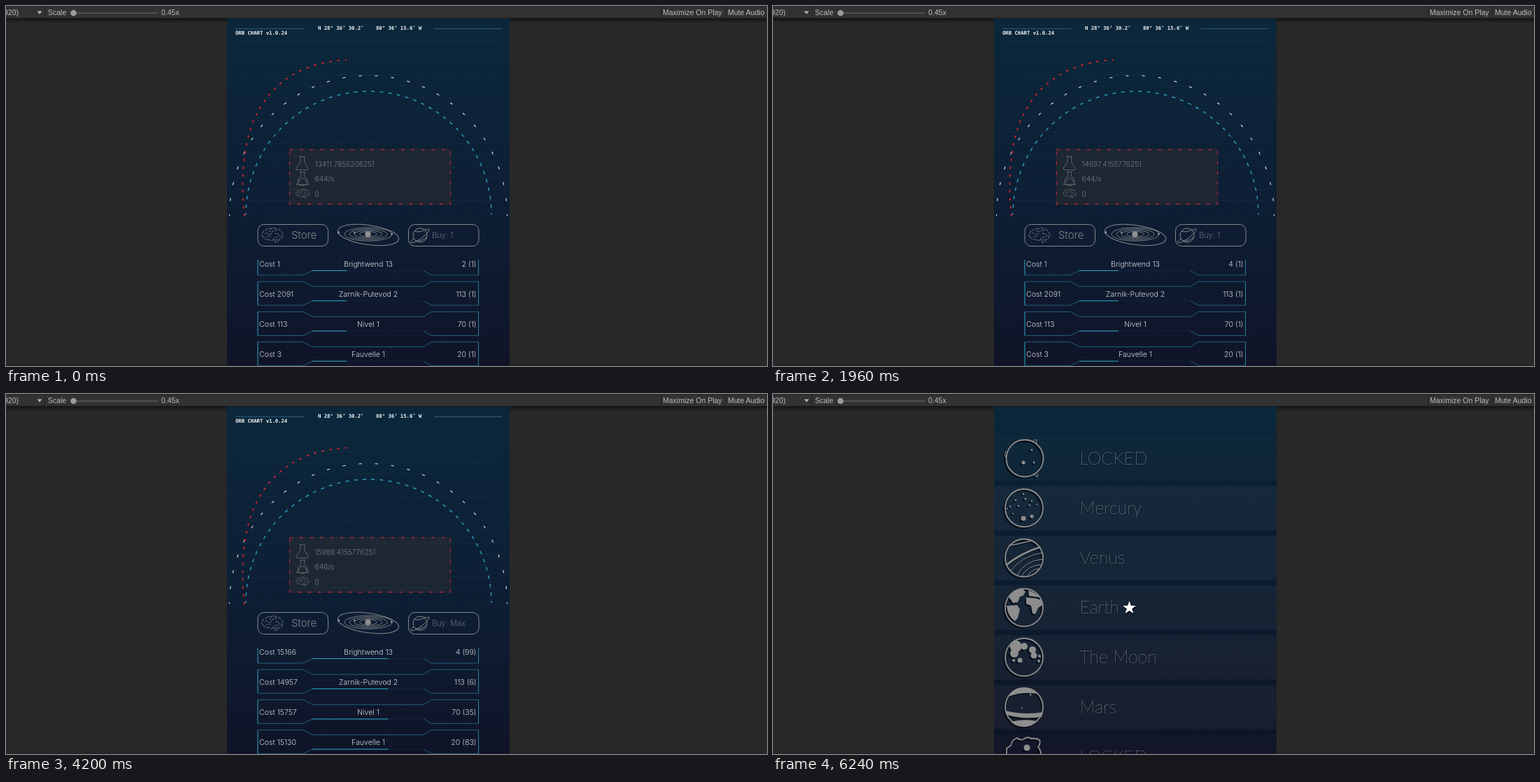
Write an HTML page that moves like this. It is 1088x515 px and loops after 8000 ms.

```html
<!DOCTYPE html>
<html lang="en">
<head>
<meta charset="utf-8">
<title>Satellite game</title>
<style>
html, body { margin: 0; width: 100%; height: 100%; overflow: hidden; background: #282828; }
svg { display: block; width: 1088px; height: 515px; }
text { white-space: pre; }
.ui { font: 10.5px "Liberation Sans", Arial, sans-serif; fill: #bdbdbd; }
.mono { font: bold 7.25px "DejaVu Sans Mono", monospace; fill: #f2f5f7; }
.game { font: 300 10.6px Inter, "Open Sans", sans-serif; fill: #d3d7db; }
.stat { font-size: 10.2px; fill: #777c80; }
.line { fill: none; stroke: #858789; stroke-width: 1; }
.thin { stroke: #6c7174; stroke-width: .8; }
.box { fill: none; stroke: #216a84; stroke-width: .9; }
.planets { fill: none; stroke: #8d8d8d; stroke-width: 1.8; filter: drop-shadow(-2px 2px 0 #050c16); }
.planets .fill { fill: #8d8d8d; stroke: none; }
.names { font: 100 25px Lato, "Open Sans", sans-serif; fill: #d3d6d9; filter: drop-shadow(1.5px 2px .5px #03070d); }
</style>
</head>
<body>
<svg viewBox="0 0 1088 515">
  <defs>
    <linearGradient id="sky" x1="0" y1="0" x2="0" y2="1">
      <stop offset="0" stop-color="#0b273b"/>
      <stop offset=".5" stop-color="#0d1f35"/>
      <stop offset="1" stop-color="#101428"/>
    </linearGradient>
    <linearGradient id="shade" x1="0" y1="0" x2="0" y2="1">
      <stop offset="0" stop-opacity=".5"/>
      <stop offset="1" stop-opacity="0"/>
    </linearGradient>
    <clipPath id="panel"><rect x="316" y="18" width="404" height="497"/></clipPath>
    <clipPath id="list"><rect x="350" y="363" width="340" height="152"/></clipPath>
    <g id="brain">
      <path vector-effect="non-scaling-stroke" d="M3 14Q-1 11 2 8Q2 4 7 4Q9 0 14 2Q18-1 22 2Q27 2 28 6Q33 9 30 13Q30 17 25 17Q24 22 20 21L18 17Q14 20 11 17Q6 18 3 14" stroke-dasharray="5 1.500"/>
      <path vector-effect="non-scaling-stroke" d="M5 9Q8 6 10 9T15 8M12 4Q13 8 17 5T23 6M7 14Q10 10 13 13M20 9Q24 7 25 11T29 11M17 17Q20 13 24 14M20 18L23 17" stroke-dasharray="3 1.500"/>
    </g>
  </defs>

  <rect width="1088" height="515" fill="#282828"/>
  <rect width="1088" height="17" fill="#323232"/>
  <rect width="1088" height="1" fill="#202020"/>
  <rect y="17" width="1088" height="1" fill="#1c1c1c"/>
  <rect y="18" width="1088" height="6" fill="url(#shade)"/>
  <rect y="514" width="1088" height="1" fill="#1e1e1e"/>
  <g fill="#222"><path d="M55 1h1v16h-1zM936 1h1v16h-1zM1028 1h1v16h-1z"/></g>
  <g class="ui">
    <text x="18" y="13" text-anchor="end">920)</text>
    <path d="M44.500 7.500h7l-3.500 4z"/>
    <text x="60" y="13">Scale</text>
    <rect x="97" y="9.500" width="120" height="1.300" fill="#626262"/>
    <circle cx="96.500" cy="10" r="4.300" fill="#9b9b9b"/>
    <text x="222" y="13">0.45x</text>
    <text x="939" y="13">Maximize On Play</text>
    <text x="1032" y="13">Mute Audio</text>
  </g>
  <rect x="316" y="18" width="404" height="497" fill="url(#sky)"/>

  <g id="track" clip-path="url(#panel)">
    <g id="haze"></g>
    <path d="M328 32.500H426M612 32.500H709" stroke="#2f5875" stroke-width="1.200"/>
    <text class="mono" x="328" y="41">ORB CHART v1.0.24</text>
    <text class="mono" x="446" y="34">N 28° 36’ 30.2″    80° 36’ 15.6″ W</text>
    <g fill="none">
      <path d="M319.500 300A198.500 200.500 0 0 1 716.500 300" pathLength="27" stroke="#e6ecef" stroke-width="1.100" stroke-dasharray=".18 .82" stroke-dashoffset=".09"/>
      <path d="M343 298.500A175.500 176.500 0 0 1 694 298.500" pathLength="45" stroke="#2c9bbb" stroke-width="1.500" stroke-dasharray=".4 .6" stroke-dashoffset=".2"/>
      <path d="M341 301C337 265 338 238 341 216C349 146 390 82 487 77" stroke="#cb2430" stroke-width="1.900" stroke-dasharray="3.500 7.800"/>
    </g>

    <rect x="405.500" y="205.500" width="230" height="78" fill="#2a2e31" fill-opacity=".55"/>
    <rect x="405.500" y="205.500" width="230" height="78" fill="none" stroke="#6d2a35" stroke-opacity=".35"/>
    <rect x="405.500" y="205.500" width="230" height="78" fill="none" stroke="#b32b36" stroke-width="1.300" stroke-dasharray="4.500 10"/>
    <g class="line thin">
      <path d="M419 215.500H428M421 216V223L415 232Q414 234.500 417 234.500H430Q433.500 234.500 432 232L426.500 223V216"/>
      <path d="M420 237.500H428M421.500 238V244A6.800 6.800 0 1 0 426.500 244V238M418 250L424 246L430 250M415 255L420 250M433 255L428 250M415 255.500H433"/>
      <use href="#brain" transform="translate(414 261.500) scale(.62)"/>
    </g>
    <g class="game">
      <text class="stat" id="score" x="441.500" y="229.500"></text>
      <text class="stat" id="rate" x="441.500" y="251"></text>
      <text class="stat" x="441.500" y="272.500">0</text>
    </g>

    <g class="line">
      <rect x="360" y="312.500" width="100.500" height="31" rx="9"/>
      <use href="#brain" transform="translate(365 317)" stroke-width=".9"/>
      <rect x="575.500" y="312.500" width="100.500" height="31" rx="9"/>
      <circle cx="592" cy="328" r="10"/>
      <path d="M583 333Q577 337 579 338.500Q582 340 594 332Q607 322 605 319.500Q604 318 600 321M584 322Q592 325 600 319M585 336Q595 337 601 331"/>
      <ellipse cx="518" cy="327.500" rx="44" ry="14" transform="rotate(8 518 327.500)"/>
      <g stroke-width=".9">
        <ellipse cx="518" cy="326.500" rx="34" ry="9.500"/>
        <ellipse cx="518" cy="326.500" rx="27" ry="7.500"/>
        <ellipse cx="518" cy="326.500" rx="20" ry="5.500"/>
        <ellipse cx="518" cy="326.500" rx="12.500" ry="3.800"/>
      </g>
      <g fill="#8d8f90" stroke="none">
        <circle cx="517.500" cy="326.500" r="4.300"/><circle cx="475.500" cy="324" r="1.800"/>
        <circle cx="551.500" cy="326" r="1.600"/><circle cx="498" cy="324" r="1.200"/>
      </g>
    </g>
    <g class="game">
      <text x="408" y="333" style="font-size:14.800px;fill:#83878a">Store</text>
      <text id="buy" x="609" y="332" style="font-size:11px;fill:#666c71"></text>
    </g>
    <g id="rows" class="game" clip-path="url(#list)"></g>
  </g>

  <g id="menu" clip-path="url(#panel)" visibility="hidden">
    <g id="bands"></g>
    <g class="planets">
      <circle cx="360" cy="92" r="26.500"/>
      <path stroke-width="1" d="M372 68L375 65L377 66L376 71M333 91L331.500 87L333 82M373 115L378 119L378 114"/>
      <circle cx="359" cy="163" r="27"/>
      <circle cx="359" cy="234.500" r="27"/>
      <path stroke-width="1.300" d="M337 217Q350 215 369 210"/>
      <path stroke-width="2.800" d="M333 245Q354 228 382 219"/>
      <path stroke-width="1" d="M340 253Q354 233 385 227M349 259Q358 240 386 236M355 261Q363 246 384 244M363 261Q368 252 380 250"/>
      <circle cx="359" cy="305.500" r="27"/>
      <path class="fill" d="M337 290Q345 279 357 279L361 283L357 289L353 290L350 298L343 299ZM334 303L349 302L353 308L350 320L346 325Q335 317 334 303ZM365 281Q376 284 381 291L366 289ZM362 291L374 292L385 295V302L379 306L375 315L371 314L369 303L362 300Z"/>
      <circle cx="359" cy="376.500" r="27"/>
      <circle cx="359" cy="447.500" r="27"/>
      <path class="fill" d="M336 433Q357 425 379 429A27 27 0 0 0 336 433ZM332 453Q360 460 386 455L384 462Q358 466 334 459ZM340 469Q359 464 378 468A27 27 0 0 1 340 469Z"/>
      <path d="M334 518L334 507L340 503Q341 495 349 492Q353 496 358 494Q364 489 369 493Q376 492 381 495Q383 500 379 505Q384 510 383 520"/>
      <g class="fill" id="craters"></g>
    </g>
    <g class="names" id="names"></g>
    <path id="star" fill="#fff" style="filter:drop-shadow(1.500px 2px .500px #03070d)"/>
  </g>
</svg>
<script>
const $ = id => document.getElementById(id);
const range = (n, fn) => Array.from({ length: n }, (_, i) => fn(i)).join('');

// Faint scan lines and specks
let seed = 7;
const rnd = () => (seed = seed * 16807 % 2147483647) / 2147483647;
$('haze').innerHTML =
  range(15, i => `<rect x="328" y="${Math.round(49 + i * 16.35)}" width="381" height="1" fill="#3a6480" opacity=".11"/>`) +
  range(70, () => `<rect x="${316 + rnd() * 403 | 0}" y="${45 + rnd() * 465 | 0}" width="1" height="1" fill="#6c9bb0" opacity="${(.1 + rnd() * .25).toFixed(2)}"/>`);

const sats = [['Brightwend 13', 2], ['Zarnik-Putevod 2', 113], ['Nivel 1', 70], ['Fauvelle 1', 20]];
$('rows').innerHTML = sats.map(([name], i) => {
  const y = i * 43.2;
  return `<g transform="translate(0 ${y.toFixed(1)})">
    <path class="box" d="M438 378.500L425 385H360V351H425L438 358H597L608 351H675.500V385H608L597 378.500"/>
    <path d="M360 351V385M675.500 351V385" stroke="#2b849f"/>
    <rect x="438" y="378" width="158" height="1" fill="#1d3f58" opacity=".35"/>
    <rect class="bar" x="438" y="378" height="1.100" fill="#2c9dbd"/>
    <text class="cost" x="362" y="372.500"></text>
    <text x="518" y="372.500" text-anchor="middle">${name}</text>
    <text class="count" x="672.500" y="372.500" text-anchor="end"></text></g>`;
}).join('');

// Planet menu
const labels = ['LOCKED', 'Mercury', 'Venus', 'Earth', 'The Moon', 'Mars', 'LOCKED'];
$('names').innerHTML = labels.map((s, i) => `<text x="438.500" y="${(101 + i * 71.1).toFixed(1)}">${s}</text>`).join('');
$('bands').innerHTML = labels.map((s, i) =>
  `<rect x="316" y="${(60.6 + i * 71.1).toFixed(1)}" width="404" height="63.500" fill="#4a4a45" opacity="${s === 'LOCKED' ? .04 : .15}"/>
   <rect x="316" y="${(124.1 + i * 71.1).toFixed(1)}" width="404" height="7.600" fill="#071426" opacity=".3"/>`).join('');
$('craters').innerHTML = `358 98 2.6,373 98 1.4,370 80 1.5,
  358 178 3.6,370 175 2.6,358 143 1.3,347 152 1.3,361 150 1.5,370 153 1.2,377 158 1,339 161 1.2,351 160 1.2,367 159 1.2,343 171 1,335 164 1,
  347 361 8.5,345 371 6,359 361 5,371 366 5,373 374 4.6,353 381 3.6,344 381 2,381 375 2,380 382 2,
  368 430 1.4,356 449 1,363 506 4.6`.split(',').map(c => {
    const [x, y, r] = c.trim().split(' ');
    return `<circle cx="${x}" cy="${y}" r="${r}"/>`;
  }).join('');
$('star').setAttribute('d', 'M' + range(10, i => {
  const r = i % 2 ? 4 : 9.8, a = i * Math.PI / 5;
  return `${(509.5 + r * Math.sin(a)).toFixed(1)} ${(306 - r * Math.cos(a)).toFixed(1)} `;
}) + 'Z');

// Price of n more when some are owned
const GROWTH = 1.07;
const price = (owned, n) => GROWTH ** owned * (GROWTH ** n - 1) / (GROWTH - 1);
const affordable = (owned, money) =>
  Math.max(1, Math.floor(Math.log(1 + money * (GROWTH - 1) / GROWTH ** owned) / Math.log(GROWTH)));

const bars = document.querySelectorAll('.bar');
const costs = document.querySelectorAll('.cost');
const counts = document.querySelectorAll('.count');
const put = (el, s) => { if (el.textContent !== s) el.textContent = s; };

function draw(ms) {
  const tick = Math.floor(ms / 40);
  const inMenu = tick >= 156;
  $('track').setAttribute('visibility', inMenu ? 'hidden' : 'visible');
  $('menu').setAttribute('visibility', inMenu ? 'visible' : 'hidden');
  if (inMenu) return;

  const cycle = (7.44 + tick) / 24;
  const pays = Math.floor(cycle);
  const bought = (tick >= 42) + (tick >= 46);
  const max = tick >= 95;
  const money = 13411.7855206251 + 644 * pays + 2 * Math.max(0, pays - 2) - price(2, bought);

  put($('score'), money.toFixed(10));
  put($('rate'), max ? '646/s' : '644/s');
  put($('buy'), max ? 'Buy: Max' : 'Buy: 1');
  sats.forEach(([, start], i) => {
    const owned = start + (i ? 0 : bought);
    const n = max ? affordable(owned, money) : 1;
    bars[i].setAttribute('width', ((cycle - pays) * 158).toFixed(2));
    put(costs[i], 'Cost ' + Math.floor(price(owned, n)));
    put(counts[i], `${owned} (${n})`);
  });
}

const t0 = performance.now();
function loop() {
  draw((performance.now() - t0) % 8000);
  requestAnimationFrame(loop);
}
loop();
</script>
</body>
</html>
```
